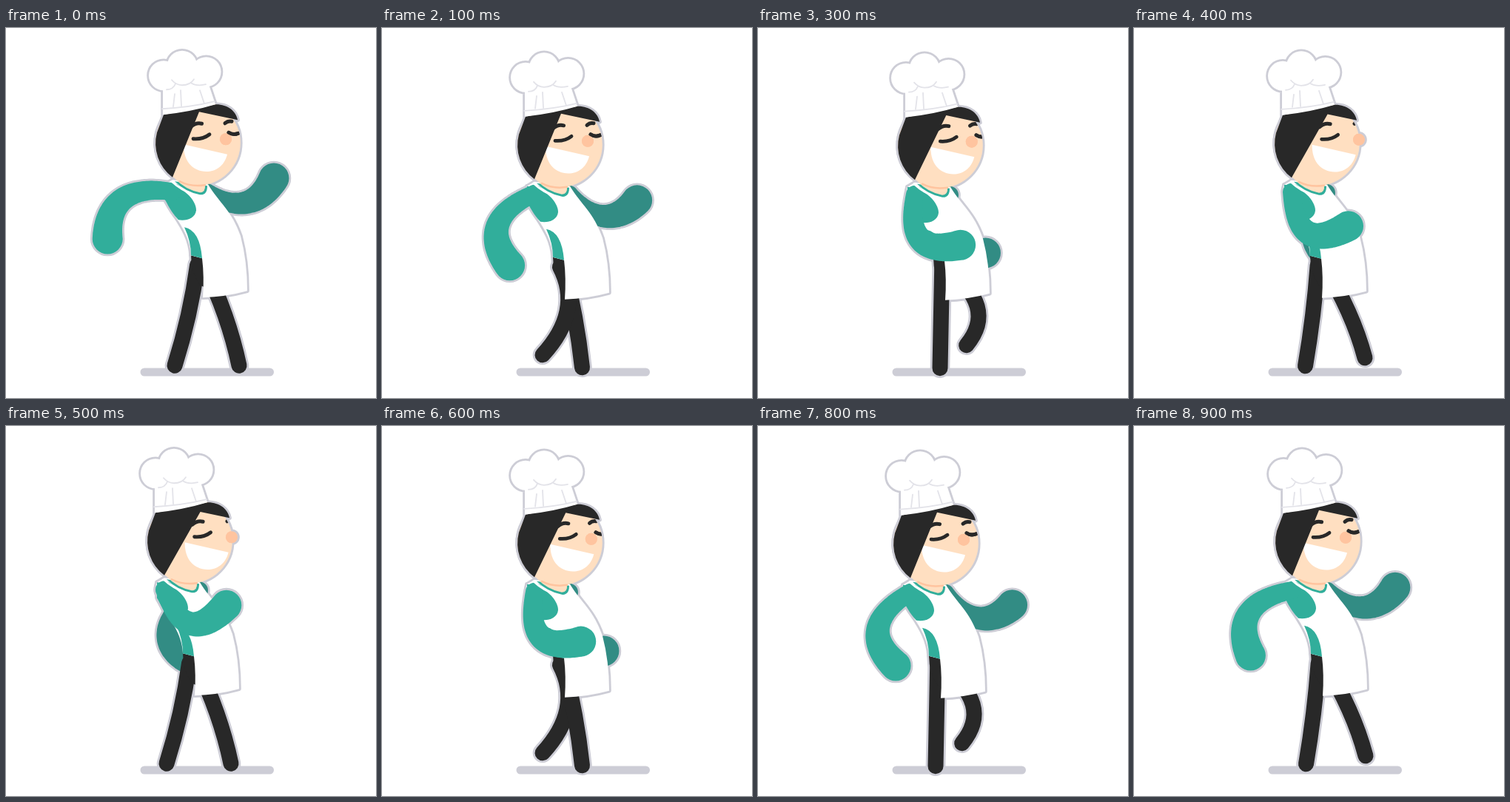
An HTML page with a canvas that plays this animation: 500 px wide and 500 px high, repeating every 1000 ms.

```html
<!DOCTYPE html>
<html lang="en">
<head>
<meta charset="utf-8">
<title>Walking chef</title>
<style>
  html, body { margin: 0; width: 100%; height: 100%; overflow: hidden; background: #fff; }
  canvas { display: block; width: 100vw; height: 100vh; }
</style>
</head>
<body>
<canvas id="stage"></canvas>
<script>
const SIZE = 500, STEP = 100, BEATS = 10, EDGE = 2.8, LEG = 21;
const GREY = '#cdcdd6', FOLD = '#e3e3e9', INK = '#282828', WHITE = '#fff';
const TEAL = '#31ae9b', SHADE = '#328c84', SKIN = '#ffdfc1', BLUSH = '#ffc49f';

const canvas = document.getElementById('stage');
const ctx = canvas.getContext('2d');
const scale = window.devicePixelRatio || 1;
canvas.width = canvas.height = SIZE * scale;

const path = d => new Path2D(d);

// [beat, value] keys, joined by straight lines around the loop
const swayKeys = [[0, 0], [1, -19], [2, -32], [3, -13], [5, -11], [7, -27], [9, -11]];
const swingKeys = [[0, 144], [2, 74], [3, 48], [5, 14], [7, 80]];
const footKeys = [[0, 315], [2, 264], [3, 259], [5, 228], [6, 236], [9, 324]];
const liftKeys = [[0, 0], [5, 0], [7, 34], [8, 31], [9, 11]];

const ground = path('M187 465H356.5');
const hip = path('M250 307L266 311L268 350L262 347Q250 330 250 307Z');
const torso = path('M225 205L273 211C288 236 305 246 317 281Q326 315 326 355Q297 363 266 364Q268 335 265 311L250 307C249 280 233 262 216 234Q212 218 215 211Z');
const side = path('M241 269Q262 273 265 311L250 307Q250 288 241 269Z');
const sleeve = path('M215 211C239 213 257 232 257 246C256 257 243 261 233 259Q224 250 215 232Z');
const strap = path('M224 207Q238 220 252 223');
const collar = path('M228 207Q242 221 262 225Q272 226 272 213Z');
const neck = path('M228 203Q242 218 262 222Q270 222 269 211Z');
const chin = path('M235 207Q250 215 269 212');
const head = disc(259.5, 155, 57.3);

const mouth = path('M240 157L299 170.5C294 190 278 196 264 193C247 189 240 175 240 157Z');
const leftEye = path('M253 149.5Q266 150.5 275 143.5');
const leftBrow = path('M250 133Q257 127 264.5 129');
const rightEye = path('M301 141Q307 145 314 142');
const rightBrow = path('M296 128.5Q300 125 305 126');

const hat = path('M212 64H270L283 103Q250 113 212 117Z');
for (const [x, y] of [[213, 64], [238, 50.5], [270.5, 59]]) hat.addPath(disc(x, y, 20));
const folds = path('M217 83Q226 83 229 75M224 70Q230 77 238 77Q249 77 254 69M250 74Q258 79 270 76M228 89L226 106M236 84L237 105M262 84L268 102M211 109Q250 107 282 99');

function keyed(keys, beat) {
  const i = keys.findLastIndex(([at]) => at <= beat);
  const [a, u] = keys[i];
  const [b, v] = keys[i + 1] ?? [BEATS, keys[0][1]];
  return u + (v - u) * (beat - a) / (b - a);
}

function disc(x, y, r) {
  const p = new Path2D();
  p.arc(x, y, r, 0, Math.PI * 2);
  return p;
}

function polar([x, y], deg, r) {
  const a = deg * Math.PI / 180;
  return [x + r * Math.cos(a), y + r * Math.sin(a)];
}

// tapered limb: discs along a bezier, widest at the hand
function arm(a, b, c, d) {
  const p = new Path2D(), n = 80;
  for (let i = 0; i <= n; i++) {
    const t = i / n, u = 1 - t;
    const [x, y] = [0, 1].map(j =>
      u * u * u * a[j] + 3 * u * u * t * b[j] + 3 * u * t * t * c[j] + t * t * t * d[j]);
    const r = 12 + 8.5 * t ** 1.3;
    p.moveTo(x + r, y);
    p.arc(x, y, r, 0, Math.PI * 2);
  }
  return p;
}

// swing is the angle from shoulder to hand; the elbow trails behind it
function nearArm(swing) {
  const s = [225, 221];
  return arm(s,
    polar(s, 56 + swing * .92, 46 + swing * .1),
    polar(s, 47 + swing * .86, 78 + swing * .085),
    polar(s, swing, 84 + swing * .17));
}

// the far arm swings against the near one
function farArm(swing) {
  const s = [272, 222];
  const angle = 121 - 1.5 * swing + .004 * swing * swing;
  return arm(s,
    polar(s, angle + 45, 51 + angle * .13),
    polar(s, angle + 24, 75 + angle * .15),
    polar(s, angle, 92));
}

// the knee pushes forward as the foot comes closer to the hip
function leg(beat) {
  const fx = keyed(footKeys, beat), fy = 456 - keyed(liftKeys, beat);
  const hx = 262 + (fx - 262) * .1, hy = 320;
  const slack = Math.sqrt(Math.max(0, 134 ** 2 - (fx - hx) ** 2 - (fy - hy) ** 2));
  const bend = slack * .45 + Math.abs(fx - 262) * .12;
  const at = t => `${hx + (fx - hx) * t + bend} ${hy + (fy - hy) * t}`;
  return path(`M${hx} ${hy}C${at(1 / 3)} ${at(2 / 3)} ${fx} ${fy}`);
}

// the parting slides along the fringe as the head turns
function hairAt(shift) {
  const x = 261 + shift, y = 113 + shift * 11 / 52;
  return path(`M225 201.5A57.3 57.3 0 0 1 204 141L213 117L283 103C299 102.5 311 112 313 124L${x} ${y}Z`);
}

function fill(p, color) {
  ctx.fillStyle = color;
  ctx.fill(p);
}

function line(p, color, width) {
  ctx.strokeStyle = color;
  ctx.lineWidth = width;
  ctx.stroke(p);
}

function shifted(dx, fn) {
  ctx.save();
  ctx.translate(dx, 0);
  fn();
  ctx.restore();
}

// features near the far cheek travel faster and slip out of sight
function drawFace(turn, face, blush) {
  const far = 7 * turn * turn;
  ctx.save();
  ctx.clip(head);
  shifted(face, () => {
    line(leftBrow, INK, 5);
    line(leftEye, INK, 4.8);
    fill(mouth, WHITE);
  });
  fill(blush, BLUSH);
  shifted(far / 2, () => line(rightBrow, INK, 5));
  shifted(far, () => line(rightEye, INK, 4.8));
  ctx.restore();
  fill(blush, BLUSH);
  if (turn < 2) {
    ctx.save();
    ctx.clip(head);
    shifted(far, () => line(rightEye, INK, 4.8));
    ctx.restore();
  }
}

function draw(k) {
  const dx = keyed(swayKeys, k);
  const dy = 2.5 * (1 + Math.cos((k - 2.15) * Math.PI * 4 / BEATS));
  const turn = Math.min(k >> 1, (BEATS - 1 - k) >> 1);
  const swing = keyed(swingKeys, k);
  const face = 6.3 * turn;
  const near = nearArm(swing), far = farArm(swing);
  const legs = [leg(k), leg((k + BEATS / 2) % BEATS)];
  const hair = hairAt(face);
  const blush = disc(297 + 4.75 * turn * turn, 150, 8);

  ctx.setTransform(scale, 0, 0, scale, 0, 0);
  ctx.lineCap = ctx.lineJoin = 'round';
  ctx.fillStyle = WHITE;
  ctx.fillRect(0, 0, SIZE, SIZE);
  line(ground, GREY, 11);
  ctx.translate(dx, dy);

  // grey rim around the joined silhouette
  for (const p of [far, hip, torso, sleeve, collar, head, hair, blush, hat, near]) {
    line(p, GREY, EDGE * 2);
  }
  for (const p of legs) line(p, GREY, LEG + EDGE * 2);

  fill(far, SHADE);
  for (const p of legs) line(p, INK, LEG);
  fill(hip, INK);
  fill(torso, WHITE);
  fill(side, TEAL);
  fill(sleeve, TEAL);
  fill(near, TEAL);
  line(strap, WHITE, 3);
  fill(collar, TEAL);
  fill(neck, SKIN);
  fill(head, SKIN);
  line(chin, BLUSH, 2.5);
  drawFace(turn, face, blush);
  fill(hair, INK);
  fill(hat, WHITE);
  line(folds, FOLD, 1.8);
}

let start, shown = -1;
function tick(now) {
  start ??= now;
  const k = Math.floor((now - start) / STEP) % BEATS;
  if (k !== shown) draw(shown = k);
  requestAnimationFrame(tick);
}
draw(0);
requestAnimationFrame(tick);
</script>
</body>
</html>
```
